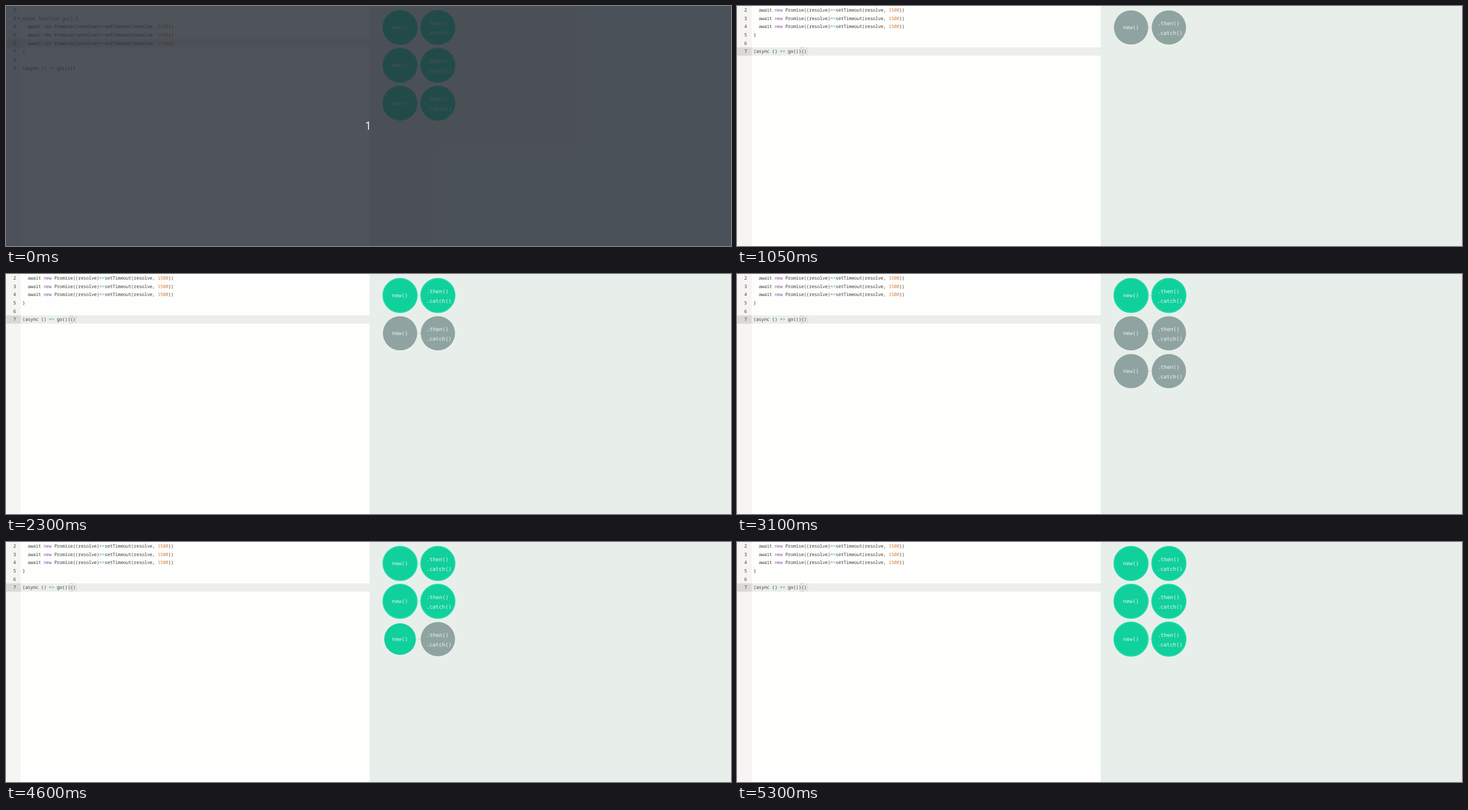
Write an HTML page that moves like this. It is 1280 by 425 pixels and loops after 6.55 s.

```html
<!DOCTYPE html>
<html lang="en">
<head>
<meta charset="utf-8">
<title>Sequential promises</title>
<style>
  html, body { margin: 0; width: 100%; height: 100%; overflow: hidden; background: #e8efeb; }
  svg { display: block; width: 1280px; height: 425px; }
  text { white-space: pre; text-rendering: geometricPrecision; }
  .code text { font: 8.3px "Noto Sans Mono", monospace; letter-spacing: -.3px; fill: #424241; }
  .code .kw { fill: #8959a8; }
  .code .fn { fill: #3d7a9c; }
  .code .op { fill: #2f9c96; }
  .code .num { fill: #d9813f; }
  .node text { font: 9.3px "DejaVu Sans Mono", monospace; fill: #eef6f2; }
  .count { font: 20px "Open Sans", sans-serif; fill: #fff; text-anchor: middle; }
</style>
</head>
<body>
<svg id="stage" viewBox="0 0 1280 425"></svg>
<script>
const LOOP = 6550, TICK = 50, RESET = 150;
const LINE = 14.65, CHAR = 4.68, CODE_X = 29;
const GREEN = '#10d09b', RING = '#1ddba6', GREY = '#8fa4a0';
const REST = 30.3, DIP = 25, PULSE = 500;

const stage = document.getElementById('stage');

function add(parent, tag, attrs = {}, text) {
  const el = document.createElementNS('http://www.w3.org/2000/svg', tag);
  for (const key in attrs) el.setAttribute(key, attrs[key]);
  if (text !== undefined) el.textContent = text;
  parent.append(el);
  return el;
}

function rect(parent, x, y, width, height, fill) {
  return add(parent, 'rect', { x, y, width, height, fill });
}

function show(el, on) {
  el.style.display = on ? '' : 'none';
}

// Editor
const TOKENS = /(\b(?:new|function)\b)|(go(?=\(\) \{))|(=>)|(\d+)|[^]/g;
const CLASSES = ['kw', 'fn', 'op', 'num'];

function codeLine(parent, source, y) {
  const line = add(parent, 'text', { x: CODE_X, y });
  let plain = '';
  const flush = () => { if (plain) line.append(plain); plain = ''; };
  for (const m of source.matchAll(TOKENS)) {
    const kind = m.slice(1).findIndex(Boolean);
    if (kind < 0) { plain += m[0]; continue; }
    flush();
    add(line, 'tspan', { class: CLASSES[kind] }, m[0]);
  }
  flush();
}

function editor(lines, active, bracket) {
  const g = add(stage, 'g', { class: 'code' });
  const top = active * LINE;
  rect(g, 0, top, 26, LINE, '#dad9d8');
  rect(g, 26, top, 616, LINE, '#ebeeeb');
  add(g, 'rect', {
    x: CODE_X + bracket * CHAR - .3, y: top + .3, width: CHAR, height: LINE - 1,
    fill: 'none', stroke: '#bfc2c0', 'stroke-width': .7
  });
  rect(g, CODE_X + lines[active].length * CHAR + .5, top + .5, .7, LINE - 1, '#c9c6c3');
  lines.forEach((source, i) => {
    const y = i * LINE + 10.1;
    add(g, 'text', { x: 17.4, y, 'text-anchor': 'end' }, i + 2);
    codeLine(g, source, y);
  });
  return g;
}

rect(stage, 0, 0, 642, 425, '#fefefd');
rect(stage, 0, 0, 26, 425, '#f6f5f4');
rect(stage, 642, 0, 638, 425, '#e8efeb');

const wait = '  await new Promise((resolve)=>setTimeout(resolve, 1500))';
const tail = [wait, wait, wait, '}', '', '(async () => go())()'];
const before = editor(['', 'async function go() {', ...tail], 4, 19);
const after = editor(tail, 5, 18);
add(before, 'path', { d: 'M19.8 20.8h4.2l-2.1 2.6z', fill: '#555' });

// Promise nodes
function makeNode(row, x, y, labels) {
  const g = add(row, 'g', { class: 'node' });
  const disc = add(g, 'circle', { cx: x, cy: y, 'stroke-width': 2 });
  const core = add(g, 'circle', { cx: x, cy: y, fill: '#12b389' });
  for (const [label, lx, ly] of labels) add(g, 'text', { x: lx, y: y + ly }, label);
  return { disc, core };
}

// shown: row appears; start: pulses begin; ring: outlines appear
const rows = [
  { shown: 150, start: [1600, 1600], ring: [2300, 2300] },
  { shown: 1650, start: [3100, 3100], ring: [3600, 3600] },
  { shown: 3100, start: [4550, 4600], ring: [5100, 5300] }
].map((row, i) => {
  const y = 38 + 67 * i;
  const g = add(stage, 'g');
  add(g, 'path', { d: `M695.7 ${y}H762.5`, stroke: '#cfdcd7', 'stroke-width': 1.2 });
  const nodes = [
    makeNode(g, 695.7, y, [['new()', 681.6, 3.2]]),
    makeNode(g, 762.5, y, [['.then()', 742.2, -3.7], ['.catch()', 741.8, 13.1]])
  ];
  return { ...row, g, nodes };
});

function drawNode({ disc, core }, age, ringed) {
  const live = age > 0 && age < PULSE;
  const dip = live ? DIP * (1 - Math.cos(2 * Math.PI * age / PULSE)) / 2 : 0;
  const r = ringed ? 30 : REST - dip;
  disc.setAttribute('r', r);
  disc.setAttribute('fill', age > 0 ? GREEN : GREY);
  disc.setAttribute('stroke', ringed ? RING : 'none');
  const growing = live && age > PULSE / 2;
  core.setAttribute('r', growing ? r / 2 : 0);
  core.setAttribute('opacity', Math.min(1, (PULSE - age) / 100));
}

// Countdown veil
const veil = add(stage, 'g');
rect(veil, 0, 0, 1280, 425, 'rgba(39,44,54,.81)');
add(veil, 'text', { class: 'count', x: 639.5, y: 219.3 }, '1');

function draw(time) {
  const t = Math.floor(time / TICK) * TICK;
  const old = t < RESET;
  show(veil, t < 50);
  show(before, old);
  show(after, !old);
  for (const { shown, start, ring, g, nodes } of rows) {
    show(g, old || t >= shown);
    nodes.forEach((node, i) =>
      drawNode(node, old ? PULSE : t - start[i], old || t >= ring[i]));
  }
}

const origin = performance.now();
function frame() {
  draw((performance.now() - origin) % LOOP);
  requestAnimationFrame(frame);
}
frame();
</script>
</body>
</html>
```
